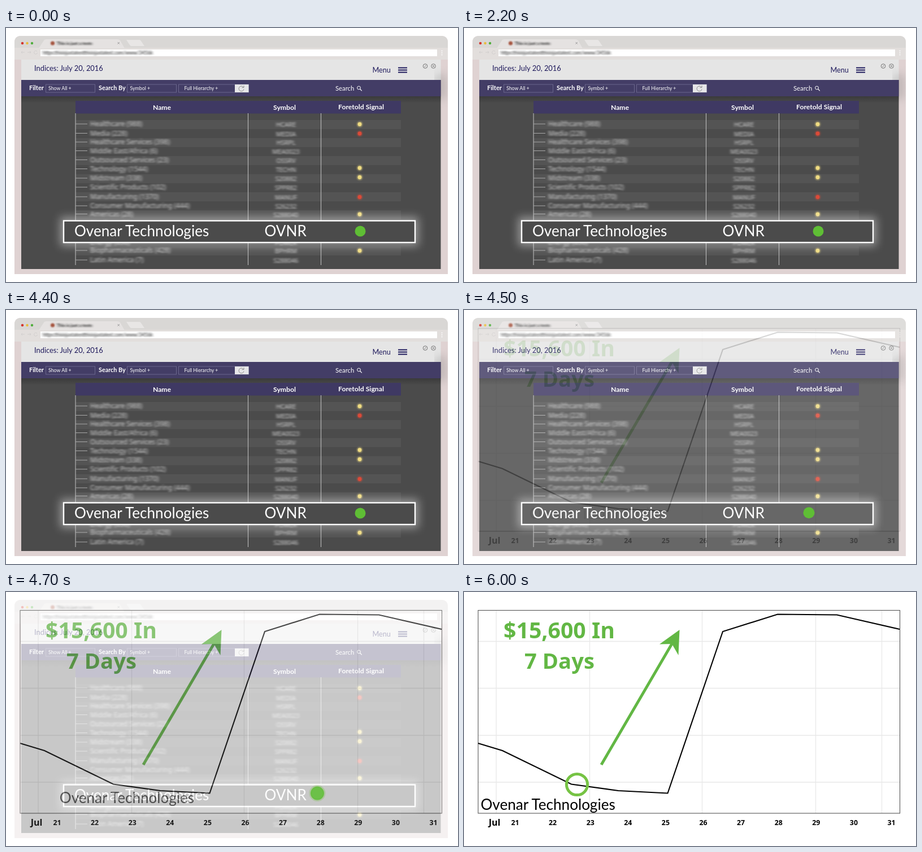
An HTML page for the animation above (6100 ms loop, 800 px wide and 450 px high).

```html
<!DOCTYPE html>
<html lang="en">
<head>
<meta charset="utf-8">
<title>Index signal</title>
<style>
html, body { margin: 0; width: 100%; height: 100%; overflow: hidden; background: #fff; }
svg { display: block; width: 100vw; height: 100vh; }
text { font-family: Lato, "Open Sans", sans-serif; }
.wide, .wide text { font-family: "Noto Sans", "Open Sans", sans-serif; }
</style>
</head>
<body>
<svg id="stage" viewBox="0 0 800 450">
  <defs>
    <filter id="smear" x="-20%" y="-40%" width="140%" height="180%"><feGaussianBlur stdDeviation="2.1 .9"/></filter>
    <filter id="soft" x="-60%" y="-60%" width="220%" height="220%"><feGaussianBlur stdDeviation="1"/></filter>
    <filter id="glow" x="-10%" y="-100%" width="120%" height="300%"><feGaussianBlur stdDeviation="8"/></filter>
    <linearGradient id="shade" x2="0" y2="1">
      <stop offset="0" stop-color="#222" stop-opacity=".4"/>
      <stop offset="1" stop-color="#222" stop-opacity="0"/>
    </linearGradient>
  </defs>
  <g id="chart"></g>
  <text id="label" font-size="26.1"></text>
  <g id="board"></g>
  <circle id="halo" fill="none"/>
  <circle id="dot"/>
</svg>
<script>
const LOOP = 6100, STEP = 100;
const COMPANY = "Ovenar Technologies";
const $ = id => document.getElementById(id);

const attrs = o => Object.entries(o).map(([k, v]) => ` ${k}="${v}"`).join("");
const rect = (x, y, w, h, fill, o = {}) =>
  `<rect x="${x}" y="${y}" width="${w}" height="${h}" fill="${fill}"${attrs(o)}/>`;
const path = (d, stroke, width = 1, o = {}) =>
  `<path d="${d}" fill="none" stroke="${stroke}" stroke-width="${width}"${attrs(o)}/>`;
const shape = (d, fill, o = {}) => `<path d="${d}" fill="${fill}"${attrs(o)}/>`;
const disc = (x, y, r, fill, o = {}) => `<circle cx="${x}" cy="${y}" r="${r}" fill="${fill}"${attrs(o)}/>`;
const text = (s, x, y, size, fill, o = {}) =>
  `<text x="${x}" y="${y}" font-size="${size}" fill="${fill}"${attrs(o)}>${s}</text>`;
const mid = { "text-anchor": "middle" };
const bold = { "font-weight": 700 };

function drawChart() {
  const green = "#62b744";
  let s = rect(0, 0, 800, 450, "#fff");
  for (const x of [57, 222.5, 421.5, 622.5, 739.5]) s += path(`M${x} 33V392`, "#e8e8e8", 1.3);
  for (const y of [87.5, 170.5, 254, 337]) s += path(`M25 ${y}H771`, "#e8e8e8", 1.3);
  s += rect(25, 32.5, 746.5, 359.5, "none", { stroke: "#555", "stroke-width": 1.1 });
  s += path("M25 268L68 281L190 340.5L273 352L360.5 356.5L458 70L555 39.5L660 40.5L771 66", "#000", 2.1);
  s += path("M243 306L369 90", green, 5);
  s += shape("M381.5 67L379.5 112L368 92L346 92.5Z", green);
  s += text("$15,600 In", 168.5, 82, 39.2, green, { ...mid, ...bold });
  s += text("7 Days", 169, 136, 38.2, green, { ...mid, ...bold });
  s += text("Jul", 54, 414, 16, "#000", { ...mid, "font-weight": 600 });
  for (let d = 21; d < 32; d++)
    s += text(d, 90.5 + (d - 21) * 66.6, 413, 12.3, "#000", { ...mid, "font-weight": 600 });
  $("chart").innerHTML = `<g class="wide">${s}</g>`;
}

function browserFrame() {
  let s = shape("M15 436V26Q15 14 27 14H770Q782 14 782 26V436Z", "#dfd2d2");
  s += shape("M15 36V26Q15 14 27 14H770Q782 14 782 26V36Z", "#d9d7d5");
  s += rect(15, 35, 767, 21, "#e2dedc");
  s += shape("M58 36L67 22Q68 20 71 20H197Q200 20 202 22L210 36Z", "#e5e2e1");
  s += shape("M213 21H236Q238 21 239 23L245 32H222Q220 32 219 30Z", "#e8e6e5");
  s += disc(29, 27, 2.3, "#d3372f") + disc(37.5, 27, 2.2, "#e8bd3c") + disc(46, 27, 2.2, "#4fae3c");
  s += disc(82.5, 27, 3.6, "#a5543f", { filter: "url(#soft)" });
  s += text("This is just a tests", 90, 30, 8, "#222", { filter: "url(#smear)", ...bold });
  s += path("M197.500 25l3.500 3.500m0-3.500l-3.500 3.500", "#888", .8);
  s += path("M33 43H27m2-2l-2 2l2 2M38 43h6m-2-2l2 2l-2 2M55 41.500a3 3 0 1 0 .5 2.500", "#d0cccb", .9);
  s += rect(61, 38, 702, 12, "#fff");
  s += text("https:thisisjustatestthisisjustatest.com/www/3456k", 65, 47, 8.6, "#222", { filter: "url(#smear)" });
  for (const y of [40.5, 44, 47.5]) s += disc(771.5, y, .9, "#fff");
  return s;
}

function toolbar() {
  const navy = "#1f1a5c", edge = { stroke: "#6b668c", "stroke-width": 1 };
  let s = rect(27, 56, 742.5, 36, "#e5e5e5");
  s += rect(760, 82, 20, 44, "#777", { filter: "url(#glow)", opacity: .3 });
  s += rect(27, 92, 742.5, 335, "#4b4b4b");
  s += rect(27, 121, 742.5, 12, "url(#shade)");
  s += rect(27, 92, 742.5, 29, "#433d66");
  s += text("Indices: July 20, 2016", 50, 76, 12.9, navy);
  s += text("Menu", 648.5, 79, 12.7, navy);
  for (const y of [70.5, 74.5, 78.5]) s += path(`M694 ${y}h16`, navy, 2);
  s += disc(742, 67.5, 3.8, "none", { stroke: "#666", "stroke-width": .9 });
  s += disc(756.5, 67.5, 3.8, "none", { stroke: "#666", "stroke-width": .9 });
  s += path("M740.500 69l3-3M755 66l3 3m0-3l-3 3", "#666", .9);
  s += text("Filter", 41, 110, 11.1, "#fff", bold) + text("Search By", 164, 110, 10.8, "#fff", bold);
  for (const [x, w] of [[70.5, 87], [214.5, 87], [305.5, 124]]) s += rect(x, 100, w, 14, "none", edge);
  s += text("Show All +", 75, 109.5, 8.8, "#fff") + text("Symbol +", 219.5, 109.5, 8.8, "#fff");
  s += text("Full Hierarchy +", 315.5, 109.5, 8.7, "#fff");
  s += rect(405, 100, 24.5, 14, "#e6e6e8");
  s += path("M420 104.500a4.500 4.500 0 1 0 1 4M421 102v3.500h-3.500", "#8a8a8a", 1);
  s += text("Search", 583, 110.5, 11.3, "#fff");
  s += disc(624.5, 106, 2.9, "none", { stroke: "#fff" }) + path("M626.500 108l3.300 3.300", "#fff", 1.2);
  return s;
}

const rows = [
  [170, "Healthcare (988)", "HCARE", "y"],
  [186.5, "Media (228)", "MEDIA", "r"],
  [202, "Healthcare Services (398)", "HSRPL"],
  [217.5, "Middle East/Africa (6)", "MEA0023"],
  [233.5, "Outsourced Services (23)", "OSSRV"],
  [249.5, "Technology (1544)", "TECHN", "y"],
  [266, "Midstream (338)", "S20882", "y"],
  [282, "Scientific Products (102)", "SPPR82"],
  [299, "Manufacturing (1370)", "MANUF", "r"],
  [315, "Consumer Manufacturing (444)", "S26232"],
  [329.5, "Americas (28)", "S288040", "y"],
  [346, "Pipelines (52)", "PIPEL"],
  [380, "Energy (650)", "POWER"],
  [394, "Biopharmaceuticals (428)", "BPHRM", "y"],
  [411, "Latin America (7)", "S288046"]
];

function table() {
  let s = "";
  for (let y = 163; y < 400; y += 32) s += rect(123, y, 576, 16, "#545454");
  s += rect(123, 129, 576, 22.5, "#3f3963");
  s += text("Name", 276, 145, 12.2, "#fff", { ...mid, ...bold });
  s += text("Symbol", 493, 145, 12.2, "#fff", { ...mid, ...bold });
  s += text("Foretold Signal", 628.5, 144, 12.2, "#fff", { ...mid, ...bold });
  for (const x of [123, 428.5, 557.5]) s += path(`M${x} 151V420`, "#c4c4c4", 1);
  let names = "", marks = "";
  for (const [y, name, code, mark] of rows) {
    s += path(`M123 ${y}h21`, "#a8a8a8", 1);
    names += text(name, 149, y + 4, 12, "#d2d2d2");
    names += text(code, 495.5, y + 5, 11, "#d2d2d2", mid);
    if (!mark) continue;
    const c = mark === "y" ? "#f0dc82" : "#dc4a38", cy = y + (y > 240 && y < 270 ? -1.5 : .5);
    marks += disc(626, cy, 5.2, c, { opacity: .45, filter: "url(#soft)" }) + disc(626, cy, 3.4, c);
  }
  return s + `<g class="wide" filter="url(#smear)">${names}</g>` + marks;
}

function highlight() {
  return rect(96, 335, 634, 51, "#fff", { filter: "url(#glow)", opacity: .42 }) +
    rect(102, 341.5, 622, 38.5, "#4b4b4b", { stroke: "#fff", "stroke-width": 2.4 }) +
    text(COMPANY, 121, 369, 26.1, "#fff") + text("OVNR", 457.5, 369, 26.1, "#fff");
}

// Smooth curve through [time, value] keys, flat at both ends.
function curve(keys) {
  const n = keys.length - 1;
  const gap = i => (keys[i + 1][1] - keys[i][1]) / (keys[i + 1][0] - keys[i][0]);
  const slope = keys.map((_, i) => {
    if (i === 0 || i === n) return 0;
    const a = gap(i - 1), b = gap(i);
    return a * b > 0 ? 2 * a * b / (a + b) : 0;
  });
  return t => {
    if (t <= keys[0][0]) return keys[0][1];
    if (t >= keys[n][0]) return keys[n][1];
    const i = keys.findIndex(k => k[0] > t) - 1;
    const [t0, a] = keys[i], [t1, b] = keys[i + 1], h = t1 - t0, u = (t - t0) / h, v = 1 - u;
    return a * v * v * (1 + 2 * u) + b * u * u * (3 - 2 * u) +
      h * u * v * (slope[i] * v - slope[i + 1] * u);
  };
}

const fade = curve([[4400, 1], [4600, .57], [4700, .3], [4900, 0]]);
const slide = curve([[4400, 0], [4600, .165], [4700, .286], [5200, .99], [5300, 1]]);
const tone = curve([[4400, 255], [4600, 120], [4700, 75], [5200, 0]]);
const travel = curve([[4400, 0], [4600, .108], [4700, .178], [5200, .607], [6000, 1]]);
const radius = curve([[4400, 9.5], [4600, 11], [4700, 12], [5200, 16], [5700, 18.6]]);
const solid = curve([[4500, 1], [4700, .88], [5200, .42], [5700, 0]]);
const ring = curve([[4500, 0], [4700, .3], [5200, .65], [5700, 1]]);

function set(el, o) {
  for (const k in o) el.setAttribute(k, o[k]);
}

function render(t) {
  const p = slide(t), q = travel(t), g = Math.round(tone(t));
  const cx = 627 - 427 * q, cy = 360 - 19 * q, r = radius(t);
  set($("board"), { opacity: fade(t) });
  set($("label"), { x: 121 - 91.5 * p, y: 369 + 17 * p, fill: `rgb(${g},${g},${g})`, opacity: t < 4500 ? 0 : 1 });
  set($("dot"), { cx, cy, r, fill: "#5fbe35", "fill-opacity": solid(t) });
  set($("halo"), { cx, cy, r, stroke: "#76c344", "stroke-width": 5, "stroke-opacity": ring(t) });
}

function tick() {
  const t = performance.now() % LOOP;
  render(Math.floor(t / STEP) * STEP);
  requestAnimationFrame(tick);
}

drawChart();
$("board").innerHTML = browserFrame() + toolbar() + table() + highlight();
$("label").textContent = COMPANY;
tick();
</script>
</body>
</html>
```
